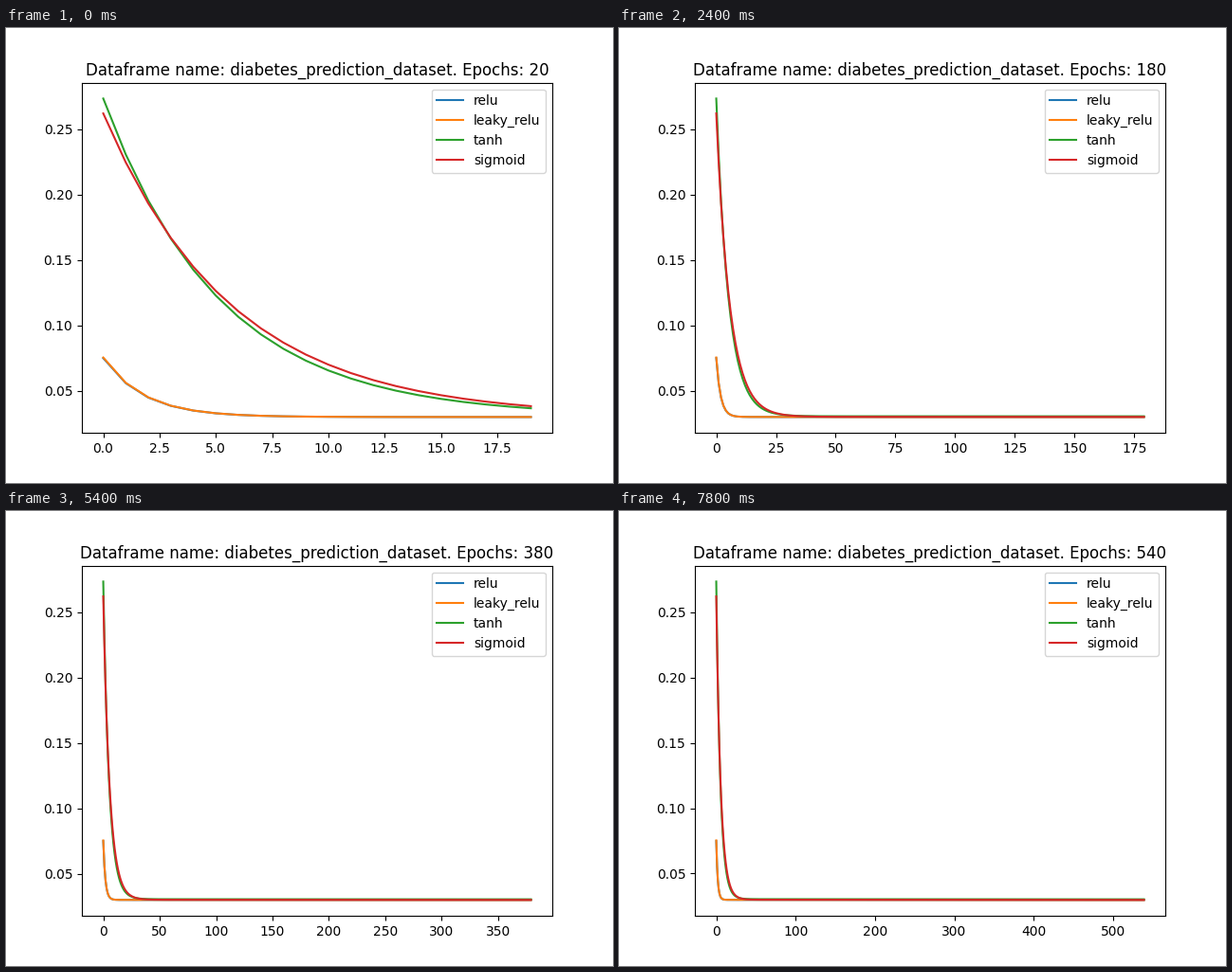
Write a matplotlib script that moves like this. It is 640 px wide and 480 px high and loops after 8000 ms.

```python
import numpy as np
import matplotlib.pyplot as plt
from matplotlib.animation import FuncAnimation

INTERVAL_MS = 100
FRAMES = 80
FRAMES_PER_STEP = 3
EPOCHS_PER_STEP = 20
DRIFT = 2.6e-7  # slow loss decrease per epoch after convergence

# activation: (final loss, initial excess loss, decay per epoch)
CURVES = {
    "relu": (0.02989, 0.0450, 0.575),
    "leaky_relu": (0.02990, 0.0455, 0.575),
    "tanh": (0.03045, 0.24305, 0.824),
    "sigmoid": (0.03000, 0.2321, 0.8387),
}

fig, ax = plt.subplots(figsize=(6.4, 4.8), dpi=100)


def loss(epoch, floor, excess, decay):
    return floor - DRIFT * epoch + excess * decay ** epoch


def draw(frame):
    epochs = EPOCHS_PER_STEP * (1 + frame // FRAMES_PER_STEP)
    x = np.arange(epochs)
    ax.clear()
    for name, params in CURVES.items():
        ax.plot(x, loss(x, *params), label=name)
    ax.set_title(f"Dataframe name: diabetes_prediction_dataset. Epochs: {epochs}")
    ax.legend(loc="upper right")
    return ax.get_children()


anim = FuncAnimation(fig, draw, frames=FRAMES, interval=INTERVAL_MS,
                     init_func=lambda: draw(0), repeat=True, repeat_delay=0)
plt.show()
```
